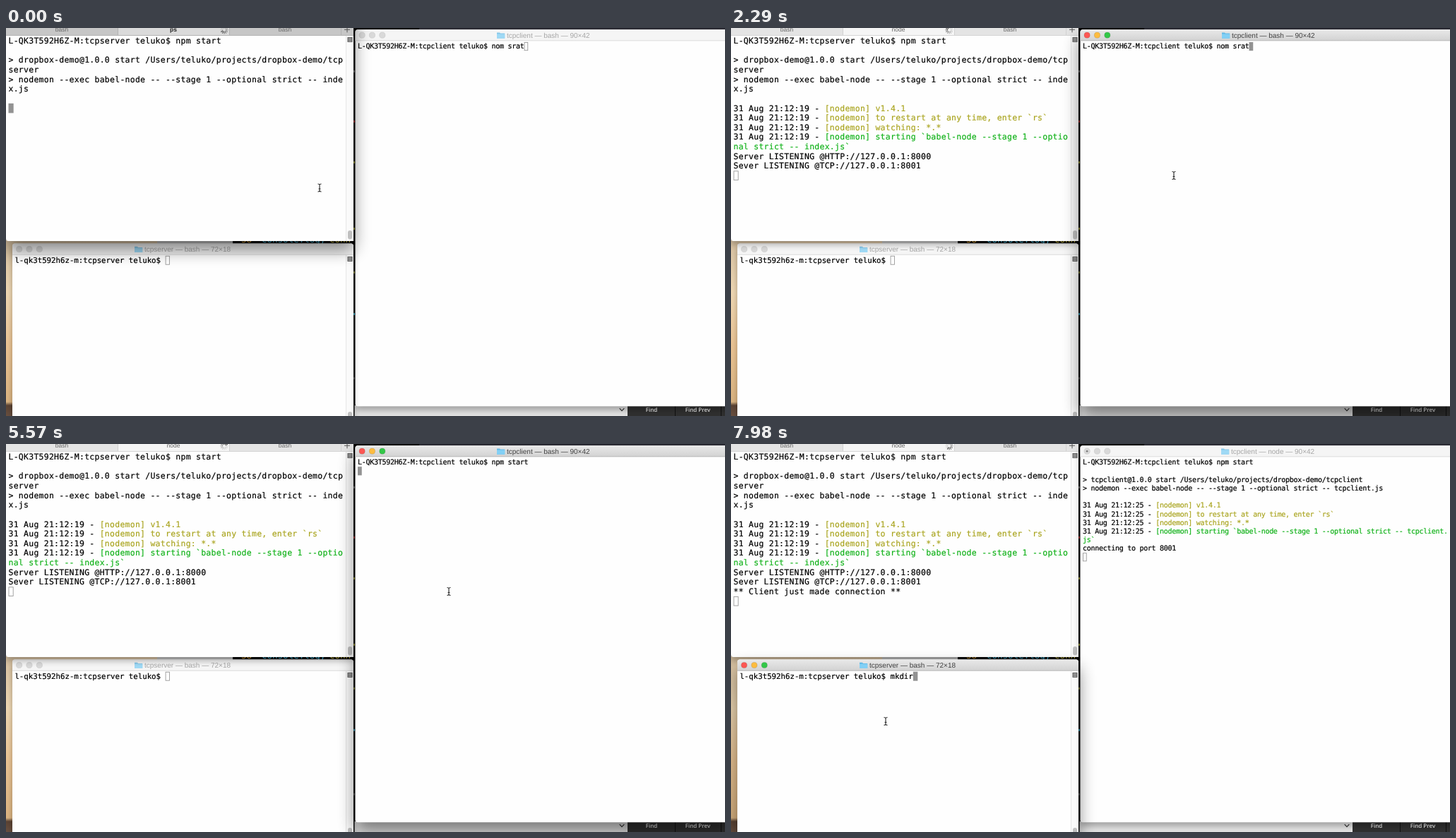
An HTML page for the animation above (8 s loop, 1018 by 550 pixels).

```html
<!DOCTYPE html>
<html lang="en">
<head>
<meta charset="utf-8">
<title>Terminals</title>
<style>
html, body { margin: 0; width: 100%; height: 100%; overflow: hidden; background: #000; }
svg { display: block; width: 100%; height: 100%; }
text { white-space: pre; text-rendering: geometricPrecision; }
.mono { font-family: "DejaVu Sans Mono", monospace; stroke-width: .2px; }
.ui { font-family: "Liberation Sans", Arial, sans-serif; }
.find { font: 600 8px "Open Sans", sans-serif; fill: #f2f2f2; text-anchor: middle; }
.k { fill: #000; stroke: #000; }
.y { fill: #aaa520; stroke: #aaa520; }
.g { fill: #12b21a; stroke: #12b21a; }
</style>
</head>
<body>
<svg id="stage" viewBox="0 0 1018 550" preserveAspectRatio="none">
  <defs>
    <linearGradient id="sand" x1="0" y1="0" x2="0" y2="1">
      <stop offset="0" stop-color="#d8c2a2"/>
      <stop offset=".3" stop-color="#f0d9b4"/>
      <stop offset=".6" stop-color="#ecc594"/>
      <stop offset=".92" stop-color="#dcb582"/>
      <stop offset=".94" stop-color="#5b4333"/>
      <stop offset="1" stop-color="#6a5040"/>
    </linearGradient>
    <linearGradient id="bar" x1="0" y1="0" x2="0" y2="1">
      <stop offset="0" stop-color="#e9e9e9"/>
      <stop offset="1" stop-color="#d2d2d2"/>
    </linearGradient>
    <clipPath id="gap"><rect x="321" y="302" width="171" height="4"/></clipPath>
  </defs>
  <g id="desk"></g>
  <g id="windows"></g>
  <g id="mouse" fill="none" stroke="#222" stroke-width="1.1">
    <path d="M-2.5-5.5Q-.4-5.5 0-4.3Q.4-5.5 2.5-5.5M0-4.3V4.3M-2.5 5.5Q-.4 5.5 0 4.3Q.4 5.5 2.5 5.5M-1.4 1.5H1.4"/>
  </g>
</svg>
<script>
const LOOP = 8000;
const USER = "teluko";
const HOST = "L-QK3T592H6Z-M";
const ROOT = `/Users/${USER}/projects/dropbox-demo/`;
const $ = id => document.getElementById(id);

function add(parent, tag, attrs = {}, text) {
  const el = document.createElementNS("http://www.w3.org/2000/svg", tag);
  for (const key in attrs) el.setAttribute(key, attrs[key]);
  if (text !== undefined) el.textContent = text;
  parent.appendChild(el);
  return el;
}
const rect = (p, x, y, width, height, fill, more) =>
  add(p, "rect", { x, y, width, height, fill, ...more });
const label = (p, x, y, size, fill, text, more) =>
  add(p, "text", { class: "ui", x, y, "font-size": size, fill, ...more }, text);

// Screen refreshes: first time, last time, count
const RUNS = [
  [0, 0, 1], [150, 1070, 7], [1220, 2140, 7], [2290, 3190, 7], [3340, 4240, 7],
  [4390, 5430, 8], [5570, 6610, 8], [6750, 7680, 7], [7830, 7980, 2]
];
const TICKS = RUNS.flatMap(([a, b, n]) =>
  Array.from({ length: n }, (_, i) => Math.floor(a + (n > 1 ? (b - a) * i / (n - 1) : 0))));

const EVENTS = [
  [0, { front: "top", tab: "ps", server: 0, client: 0, title: "bash", typed: "nom srat", shell: "" }],
  [450, { server: 1, tab: "node" }],
  [1070, { server: 2 }],
  [1220, { front: "right" }],
  [2590, { typed: "nom sra" }],
  [2890, { typed: "nom sr" }],
  [3190, { typed: "nom s" }],
  [3340, { typed: "nom " }],
  [3490, { typed: "nom" }],
  [3640, { typed: "no" }],
  [3790, { typed: "n" }],
  [4090, { typed: "np" }],
  [4390, { typed: "npm" }],
  [4530, { typed: "npm " }],
  [4680, { typed: "npm s" }],
  [4830, { typed: "npm st" }],
  [4980, { typed: "npm sta" }],
  [5130, { typed: "npm star" }],
  [5280, { typed: "npm start" }],
  [5570, { client: 1 }],
  [6010, { client: 2, title: "node" }],
  [6450, { client: 3 }],
  [7050, { client: 4, server: 3 }],
  [7210, { front: "bottom" }],
  [7360, { shell: "m" }],
  [7680, { shell: "mk" }],
  [7830, { shell: "mkdi" }],
  [7980, { shell: "mkdir" }]
];

// time, x, y of the pointer
const PATH = [
  [0, 444, 226.5], [300, 444, 226.5], [763, 403, 228], [916, 490, 224], [1070, 627, 209],
  [5860, 627, 209], [6610, 225, 391], [6750, 219, 393], [LOOP, 219, 393]
];

const TERMS = {
  top: { x: 3.5, y: 11.4, size: 11.49, cell: 7.18, pitch: 13.64 },
  right: { x: 498, y: 20, size: 10.05, cell: 5.744, pitch: 12.2 },
  bottom: { x: 12.4, y: 322.8, size: 10.77, cell: 6.46, pitch: 12.92 }
};
const FRAMES = {
  top: { x: 0, y: -40, w: 492, h: 342 },
  right: { x: 494.5, y: 2.3, w: 533, h: 533.9 },
  bottom: { x: 9, y: 305.6, w: 483, h: 252 }
};
const STACK = {
  top: ["right", "bottom", "top"],
  right: ["bottom", "top", "right"],
  bottom: ["top", "right", "bottom"]
};

const plain = s => [["k", s]];
const log = (time, msg, cls = "y") => [["k", `31 Aug 21:12:${time} - `], [cls, "[nodemon] " + msg]];
const banner = time => [
  log(time, "v1.4.1"),
  log(time, "to restart at any time, enter `rs`"),
  log(time, "watching: *.*")
];

function serverRows(s) {
  const rows = [
    plain(`${HOST}:tcpserver ${USER}$ npm start`), [],
    plain(`> dropbox-demo@1.0.0 start ${ROOT}tcp`), plain("server"),
    plain("> nodemon --exec babel-node -- --stage 1 --optional strict -- inde"), plain("x.js"), []
  ];
  if (s.server > 0) rows.push(...banner(19),
    log(19, "starting `babel-node --stage 1 --optio", "g"), [["g", "nal strict -- index.js`"]]);
  if (s.server > 1) rows.push(plain("Server LISTENING @HTTP://127.0.0.1:8000"),
    plain("Sever LISTENING @TCP://127.0.0.1:8001"));
  if (s.server > 2) rows.push(plain("** Client just made connection **"));
  return [...rows, []];
}

function clientRows(s) {
  const rows = [plain(`${HOST}:tcpclient ${USER}$ ${s.typed}`)];
  if (s.client > 1) rows.push([], plain(`> tcpclient@1.0.0 start ${ROOT}tcpclient`),
    plain("> nodemon --exec babel-node -- --stage 1 --optional strict -- tcpclient.js"), []);
  if (s.client > 2) rows.push(...banner(25),
    log(25, "starting `babel-node --stage 1 --optional strict -- tcpclient.", "g"), [["g", "js`"]]);
  if (s.client > 3) rows.push(plain("connecting to port 8001"));
  return s.client ? [...rows, []] : rows;
}

const shellRows = s => [plain(`${HOST.toLowerCase()}:tcpserver ${USER}$ ${s.shell}`)];

function drawTerm(p, { x, y, size, cell, pitch }, rows, active) {
  const last = rows.length - 1;
  const cols = rows[last].reduce((n, part) => n + part[1].length, 0);
  const cx = x + cols * cell, cy = y + last * pitch;
  if (active) rect(p, cx, cy, cell, pitch, "#929292");
  else rect(p, cx + .5, cy + .5, cell - 1, pitch - 1, "#fff", { stroke: "#999", "stroke-width": .9 });
  rows.forEach((row, i) => {
    if (!row.length) return;
    const line = add(p, "text", {
      class: "mono", x, y: y + i * pitch + size * .928, "font-size": size,
      style: `letter-spacing:${(cell - size * .60205).toFixed(3)}px`
    });
    row.forEach(([cls, str]) => add(line, "tspan", { class: cls }, str));
  });
}

function drawFrame(p, { x, y, w, h }, active) {
  const [dy, blur, alpha] = active ? [12, 12, .48] : [5, 5, .3];
  rect(p, x, y + dy, w, h, "#000", { opacity: alpha, style: `filter:blur(${blur}px)` });
  rect(p, x, y, w, h, "#fefefe", { rx: 3.5 });
}

function drawTitle(p, { x, y, w }, textX, title, active, busy) {
  add(p, "path", {
    d: `M${x} ${y + 15.7}v-12q0-3.7 3.7-3.7h${w - 7.4}q3.7 0 3.7 3.7v12z`,
    fill: active ? "url(#bar)" : "#f5f5f5"
  });
  rect(p, x, y + 15.2, w, .8, active ? "#b0b0b0" : "#d4d4d4");
  ["#fc5753", "#fdbc40", "#33c748"].forEach((color, i) => {
    const cx = x + 9.6 + i * 14.35, cy = y + 7.9;
    add(p, "circle", {
      cx, cy, r: 4.1, fill: active ? color : "#d9d9d9",
      stroke: active ? "#0003" : "#c8c8c8", "stroke-width": .6
    });
    if (busy && !i) add(p, "circle", { cx, cy, r: 1.3, fill: active ? "#8e1410" : "#777" });
  });
  const fx = textX - 14, fy = y + 3.4;
  const folder = add(p, "g", { opacity: active ? 1 : .75 });
  add(folder, "path", { d: `M${fx} ${fy + 9}v-8.3h4l1 1.2h6.2v7.1z`, fill: "#62b9e6" });
  rect(folder, fx, fy + 2.8, 11.2, 6.2, "#83d0f5");
  label(p, textX, y + 11.3, 10, active ? "#404040" : "#a6a6a6", title);
}

function drawScroll(p, y, h, thumbY) {
  rect(p, 481, y, 11, h, "#fafafa");
  rect(p, 481, y, .8, h, "#e2e2e2");
  rect(p, 484, thumbY, 6, 12.5, "#c0c0c0", { rx: 3 });
  rect(p, 483.5, y + 2, 7, 7, "#555");
  for (const dy of [3.3, 5.2, 7]) rect(p, 484.5, y + dy, 5, .8, "#ddd");
}

function drawSpinner(p, time) {
  const lead = Math.floor(time / 1000 * 12 + 8);
  for (let i = 0; i < 12; i++) {
    const age = ((lead - i) % 12 + 12) % 12;
    add(p, "path", {
      d: "M0-2.4V-5.2", stroke: "#333", "stroke-width": 1, "stroke-linecap": "round",
      opacity: Math.max(.18, .95 - age * .1),
      transform: `translate(309 2.8) rotate(${i * 30})`
    });
  }
}

function drawTabs(p, s, active, time) {
  rect(p, 0, 0, 492, 10.5, active ? "#c6c6c6" : "#e4e4e4");
  rect(p, 159, 0, 157, 10.5, active ? "#dadada" : "#f5f5f5");
  for (const x of [158, 316, 474]) rect(p, x, 0, .8, 10, active ? "#adadad" : "#cdcdcd");
  rect(p, 0, 10, 492, .8, active ? "#a9a9a9" : "#cfcfcf");
  const mid = { "text-anchor": "middle" };
  for (const x of [79, 395]) label(p, x, 5.4, 8.5, "#666", "bash", mid);
  label(p, 237, 5.4, 8.5, active ? "#222" : "#666", s.tab, { ...mid, "font-weight": active ? 700 : 400 });
  add(p, "path", { d: "M479 2.3h8M483-1.7v8", stroke: "#555", "stroke-width": 1 });
  drawSpinner(p, time);
}

const WINDOWS = {
  top(p, s, active, time) {
    drawTabs(p, s, active, time);
    drawScroll(p, 11, 291, 287);
    drawTerm(p, TERMS.top, serverRows(s), active);
  },
  right(p, s, active) {
    const title = `tcpclient — ${s.title} — 90×42`;
    drawTitle(p, FRAMES.right, s.title === "node" ? 708 : 709, title, active, s.client > 1);
    drawTerm(p, TERMS.right, clientRows(s), active);
  },
  bottom(p, s, active) {
    drawTitle(p, FRAMES.bottom, 196, "tcpserver — bash — 72×18", active);
    drawScroll(p, 322, 228, 544);
    drawTerm(p, TERMS.bottom, shellRows(s), active);
  }
};

function drawDesk(p) {
  rect(p, 0, 0, 1018, 550, "#050505");
  rect(p, 0, 300, 214, 250, "url(#sand)");
  rect(p, 214, 300, 107, 8, "#c4c4c4");
  rect(p, 585, 0, 433, 3, "#2d2d36");
  const code = add(p, "g", { "clip-path": "url(#gap)" });
  [[333, "#d9a23a", "38"], [362, "#4fc3e8", "console.log,"], [458, "#d8c84a", "conn"]].forEach(
    ([x, fill, str]) => add(code, "text", { class: "mono", x, y: 304.3, "font-size": 12.5, fill }, str));
  [[60, "#777"], [131, "#b33"], [189, "#aaa83a"], [283, "#aaa83a"], [345, "#8a8a3a"], [404, "#3bb6d6"], [495, "#555"]]
    .forEach(([y, fill]) => rect(p, 492.3, y, 1.6, 3, fill));
  rect(p, 493.5, 535, 387, 15, "#e2e2e2");
  add(p, "path", { d: "M868.7 539.2L872 542.6L875.3 539.2", fill: "none", stroke: "#333", "stroke-width": 1.2 });
  rect(p, 880, 530, 138, 20, "#303030");
  for (const x of [947, 1012]) rect(p, x, 530, 1, 20, "#111");
  add(p, "text", { class: "find", x: 914, y: 543.5 }, "Find");
  add(p, "text", { class: "find", x: 979.5, y: 543.5 }, "Find Prev");
}

function pointer(time) {
  const i = PATH.findIndex(k => k[0] > time);
  const [t0, x0, y0] = PATH[i - 1], [t1, x1, y1] = PATH[i];
  const u = (time - t0) / (t1 - t0), e = u * u * (3 - 2 * u);
  return [x0 + (x1 - x0) * e, y0 + (y1 - y0) * e];
}

function render(time) {
  const state = Object.assign({}, ...EVENTS.filter(e => e[0] <= time + 8).map(e => e[1]));
  const root = $("windows");
  root.replaceChildren();
  for (const name of STACK[state.front]) {
    const g = add(root, "g"), active = name === state.front;
    drawFrame(g, FRAMES[name], active);
    WINDOWS[name](g, state, active, time);
  }
  $("mouse").setAttribute("transform", `translate(${pointer(time)})`);
}

drawDesk($("desk"));
const start = performance.now();
let shown = -1;
function loop() {
  const now = Math.max(0, performance.now() - start) % LOOP;
  const tick = TICKS.filter(t => t <= now).pop();
  if (tick !== shown) render(shown = tick);
  requestAnimationFrame(loop);
}
loop();
</script>
</body>
</html>
```
